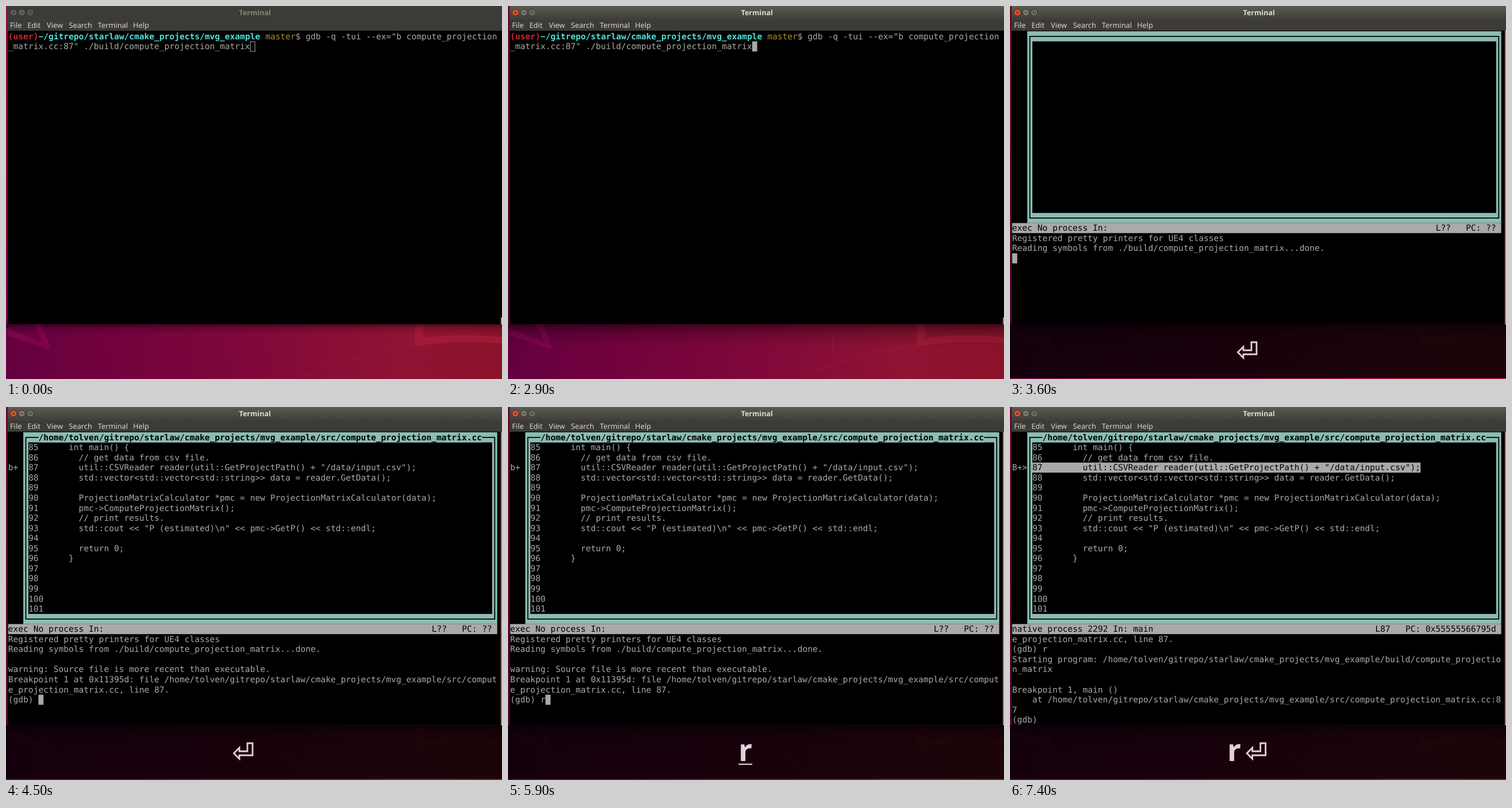
Animation, 863 px wide and 649 px high, one loop 8000 ms. Source, as an HTML page:

```html
<!DOCTYPE html>
<html lang="en">
<head>
<meta charset="utf-8">
<title>Terminal</title>
<style>
html, body { margin: 0; width: 100%; height: 100%; overflow: hidden; background: #000; }
svg { display: block; width: 863px; height: 649px; }
text { white-space: pre; text-rendering: geometricPrecision; }
.mono { font: 14.57px "DejaVu Sans Mono", monospace; }
.bold { font-weight: bold; }
.ui { font: 12.75px "Noto Sans", sans-serif; }
.title { font: bold 12.55px "Noto Sans", sans-serif; }
.key { font: bold 53px "Noto Sans", sans-serif; }
</style>
</head>
<body>
<svg id="stage" viewBox="0 0 863 649">
  <defs>
    <linearGradient id="wall" gradientUnits="userSpaceOnUse" x1="0" y1="649" x2="863" y2="600">
      <stop offset="0" stop-color="#64003f"/>
      <stop offset=".22" stop-color="#72023e"/>
      <stop offset=".5" stop-color="#80083a"/>
      <stop offset=".8" stop-color="#8f1333"/>
      <stop offset="1" stop-color="#8c122b"/>
    </linearGradient>
    <linearGradient id="edge" x2="0" y2="1">
      <stop offset="0" stop-color="#8c0f38"/>
      <stop offset="1" stop-color="#6f0243"/>
    </linearGradient>
    <linearGradient id="bar" x2="0" y2="1">
      <stop offset="0" stop-color="#5b5a51"/>
      <stop offset="1" stop-color="#3e3d38"/>
    </linearGradient>
    <linearGradient id="shade" x2="0" y2="1">
      <stop offset="0" stop-color="#000" stop-opacity=".5"/>
      <stop offset=".4" stop-color="#000" stop-opacity=".17"/>
      <stop offset="1" stop-color="#000" stop-opacity="0"/>
    </linearGradient>
  </defs>
</svg>
<script>
const LOOP = 8000;
const X0 = 3.8, Y0 = 44, CW = 8.772, CH = 17.56;
const GRAY = "#a9a9a9", TEAL = "#8cbcb2", KEY = "#e2cfd9";
const colX = c => X0 + c * CW;
const rowY = r => Y0 + r * CH;

const stage = document.getElementById("stage");
const timed = [];

// Adds a shape; optional [from, to] spans limit when it is visible.
function add(tag, attrs, spans, parent = stage) {
  const el = document.createElementNS("http://www.w3.org/2000/svg", tag);
  for (const name in attrs) el.setAttribute(name, attrs[name]);
  parent.append(el);
  if (spans) timed.push({ el, spans });
  return el;
}
const rect = (x, y, width, height, fill, spans, parent) =>
  add("rect", { x, y, width, height, fill }, spans, parent);
const path = (d, attrs, spans, parent) =>
  add("path", { d, fill: "none", ...attrs }, spans, parent);

function label(x, y, text, cls, fill, spans, parent) {
  const el = add("text", { x, y, class: cls, fill }, spans, parent);
  el.textContent = text;
  return el;
}
const type = (row, col, text, spans, fill = GRAY, bold = false, parent) =>
  label(colX(col), rowY(row) + 13.6, text, bold ? "mono bold" : "mono", fill, spans, parent);
const cells = (row, col, cols, fill, spans, parent) =>
  rect(colX(col), rowY(row), cols * CW, CH, fill, spans, parent);

function drawDesktop() {
  rect(0, 0, 863, 649, "url(#edge)");
  rect(0, 553, 863, 96, "url(#wall)");
  path("M0 560L70 587L76 597L0 573Z M48 553H61L78 597L66 589Z", { fill: "#8c0850", opacity: .6 });
  path("M66 590L102 649M160 568L250 649M385 570L455 649M455 570L530 649",
    { stroke: "#9b1250", "stroke-width": 2, opacity: .14 });
  path("M565 553V600M510 645Q600 610 712 589", { stroke: "#b02848", "stroke-width": 3, opacity: .15 });
  path("M712 553H726V577Q795 569 863 576V587Q785 580 711 592Z", { fill: "#a91d3b", opacity: .7 });

  const blurred = [[0, 600]], focused = [[600, LOOP]];
  rect(0, 553, 863, 18, "url(#shade)", blurred);
  rect(0, 553, 863, 42, "url(#shade)", focused);
  add("rect", { width: 3, height: 553, fill: "#000", opacity: .27 }, focused);
}

function drawWindow() {
  const blurred = [[0, 500]], focused = [[500, LOOP]];
  rect(3, 0, 860, 553.6, "#000");
  rect(3, 0, 860, 43, "#3c3b37");
  rect(3, 0, 860, 24, "url(#bar)", focused);

  const marks = ["M-2-2L2 2M2-2L-2 2", "M-2.5 0H2.5", "M-2-2H2V2H-2Z"];
  marks.forEach((mark, i) => {
    const g = add("g", { transform: `translate(${13 + i * 14.6} 11.3)` });
    const button = (fill, stroke, spans) => {
      add("circle", { r: 5.6, fill, stroke, "stroke-width": 1 }, spans, g);
      path(mark, { stroke, "stroke-width": 1.1 }, spans, g);
    };
    button("#62615b", "#373632", blurred);
    button(i ? "#7b796f" : "#e4572e", i ? "#35342f" : "#5a2416", focused);
  });

  for (const [fill, spans] of [["#85837b", blurred], ["#dfdbd2", focused]])
    label(433.2, 15.8, "Terminal", "title", fill, spans).setAttribute("text-anchor", "middle");
  const menu = { File: 7, Edit: 37.2, View: 71, Search: 109.5, Terminal: 159.8, Help: 221 };
  for (const name in menu) label(menu[name], 38, name, "ui", "#d9d5cc");

  rect(861, 542, 2, 12, "#aaa69d", blurred);
  rect(861, 542, 2, 12, "#df6f45", [[500, 3300]]);
  rect(861, 43, 2, 511, "#df6f45", [[3300, LOOP]]);
}

function drawShell() {
  const g = add("g", {}, [[0, 3300]]);
  type(0, 0, "(user)", null, "#cd2733", true, g);
  type(0, 6, "~/gitrepo/starlaw/cmake_projects/mvg_example", null, "#4de3d9", true, g);
  type(0, 51, "master", null, "#ae8d32", false, g);
  type(0, 57, '$ gdb -q -tui --ex="b compute_projection', null, GRAY, false, g);
  type(1, 0, '_matrix.cc:87" ./build/compute_projection_matrix', null, GRAY, false, g);
}

const project = "/home/tolven/gitrepo/starlaw/cmake_projects/mvg_example";
const source = [
  "    int main() {",
  "      // get data from csv file.",
  '      util::CSVReader reader(util::GetProjectPath() + "/data/input.csv");',
  "      std::vector<std::vector<std::string>> data = reader.GetData();",
  "",
  "      ProjectionMatrixCalculator *pmc = new ProjectionMatrixCalculator(data);",
  "      pmc->ComputeProjectionMatrix();",
  "      // print results.",
  '      std::cout << "P (estimated)\\n" << pmc->GetP() << std::endl;',
  "",
  "      return 0;",
  "    }"
];

function drawSource() {
  const frame = add("g", {}, [[3300, LOOP]]);
  rect(colX(3), rowY(0), 94 * CW, 19 * CH, TEAL, null, frame);
  rect(colX(4), rowY(1), 92 * CW, 17 * CH, "#000", null, frame);
  const left = colX(3.5), right = colX(96.5), top = rowY(.5), bottom = rowY(18.5);
  path(`M${left} ${top}H${right}V${bottom}H${left}Z`, { stroke: "#000", "stroke-width": 1.8 }, null, frame);

  const code = add("g", {}, [[4400, LOOP]]);
  cells(0, 6, 88, TEAL, null, code);
  type(0, 6, project + "/src/compute_projection_matrix.cc", null, "#000", true, code);
  for (let i = 0; i < 17; i++) {
    const line = `${85 + i}  ${source[i] || ""}`;
    type(i + 1, 4, line, null, GRAY, false, code);
    if (i === 2) {
      const stopped = [[7400, LOOP]];
      cells(i + 1, 4, line.length, GRAY, stopped);
      type(i + 1, 4, line, stopped, "#000");
    }
  }
  type(3, 0, "b+", [[4500, 7400]]);
  type(3, 0, "B+>", [[7400, LOOP]]);
}

function drawStatus() {
  cells(19, 0, 97, GRAY, [[3300, LOOP]]);
  const status = (col, text, from, to) => type(19, col, text, [[from, to]], "#000");
  status(0, "exec No process In:", 3300, 7000);
  status(0, "native process 2292 In:", 7000, 7400);
  status(84, "L??   PC: ??", 3300, 7400);
  status(0, "native process 2292 In: main", 7400, LOOP);
  status(72, "L87   PC: 0x55555566795d", 7400, LOOP);
}

function drawLog() {
  // line, column, time of appearance, text
  const log = [
    [0, 0, 3400, "Registered pretty printers for UE4 classes"],
    [1, 0, 3400, "Reading symbols from ./build/compute_projection_matrix..."],
    [1, 57, 3600, "done."],
    [3, 0, 4400, "warning: Source file is more recent than executable."],
    [4, 0, 4500, `Breakpoint 1 at 0x11395d: file ${project}/src/comput`],
    [5, 0, 4500, "e_projection_matrix.cc, line 87."],
    [6, 0, 4500, "(gdb) "],
    [6, 6, 5900, "r"],
    [7, 0, 7000, `Starting program: ${project}/build/compute_projectio`],
    [8, 0, 7000, "n_matrix"],
    [10, 0, 7400, "Breakpoint 1, main ()"],
    [11, 0, 7400, `    at ${project}/src/compute_projection_matrix.cc:8`],
    [12, 0, 7400, "7"],
    [13, 0, 7400, "(gdb) "]
  ];
  // first visible line, from, to
  const scrolls = [[0, 3300, 7000], [1, 7000, 7400], [5, 7400, LOOP]];
  for (const [first, from, to] of scrolls)
    for (const [line, col, at, text] of log)
      if (line >= first && at < to)
        type(20 + line - first, col, text, [[Math.max(at, from), to]]);
}

function drawCursor() {
  add("rect", {
    x: colX(48) + .5, y: rowY(1) + .5, width: CW - 1, height: CH - .6,
    fill: "none", stroke: GRAY
  }, [[0, 500]]);
  // row, column, visible spans
  const stops = [
    [1, 48, [500, 1100], [1700, 2300], [2900, 3200]],
    [2, 0, [3200, 3300]],
    [20, 0, [3300, 3400]],
    [21, 57, [3400, 3600]],
    [22, 0, [3600, 3800]],
    [24, 0, [4400, 4500]],
    [26, 6, [4500, 5500], [5700, 5900]],
    [26, 7, [5900, 6500], [6800, 6900]],
    [27, 0, [6900, 7000]],
    [28, 0, [7000, 7400]]
  ];
  for (const [row, col, ...spans] of stops) cells(row, col, 1, GRAY, spans);
}

function drawKeys() {
  add("rect", { y: 554, width: 863, height: 93, fill: "#000", opacity: .8 }, [[3200, 4700], [5900, LOOP]]);
  const enter = (x, from, to) => path(
    `M${x + 26} 585H${x + 35}V606H${x + 12}V612L${x + 2.5} 602.5L${x + 12} 593V599H${x + 26}Z`,
    { stroke: KEY, "stroke-width": 2.8 }, [[from, to]]);
  const underline = (x, width, from, to) => rect(x, 620.5, width, 2.2, KEY, [[from, to]]);

  enter(394, 3200, 4700);
  underline(394, 38, 3200, 3400);
  label(401, 616, "r", "key", KEY, [[5900, 6800]]);
  underline(401, 24, 5900, 6300);
  label(378, 616, "r", "key", KEY, [[6800, LOOP]]);
  enter(409.7, 6800, LOOP);
  underline(409.7, 38, 6800, 7000);
}

[drawDesktop, drawWindow, drawShell, drawSource, drawStatus, drawLog, drawCursor, drawKeys]
  .forEach(draw => draw());

const start = performance.now();
function render() {
  const t = (performance.now() - start) % LOOP;
  for (const { el, spans } of timed)
    el.style.display = spans.some(([from, to]) => t >= from && t < to) ? "" : "none";
  requestAnimationFrame(render);
}
render();
</script>
</body>
</html>
```
